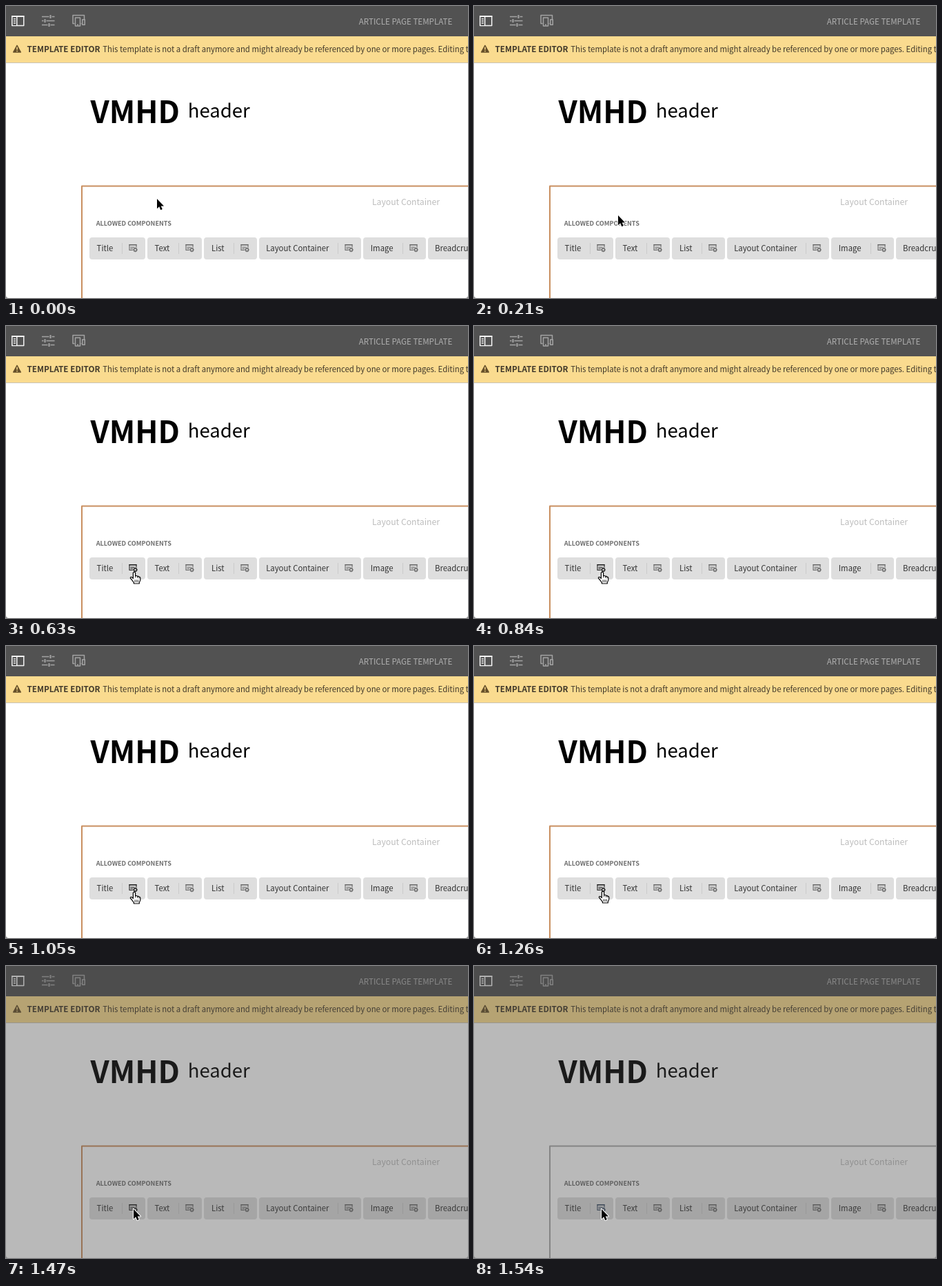
Write an HTML page with a canvas that moves like this. It is 670 px wide and 424 px high and loops after 1.61 s.

```html
<!DOCTYPE html>
<html lang="en">
<head>
<meta charset="utf-8">
<title>Template editor</title>
<style>
  html, body { margin: 0; width: 100%; height: 100%; overflow: hidden; background: #fff; }
  canvas { display: block; width: 670px; height: 424px; }
</style>
</head>
<body>
<canvas id="stage" width="670" height="424"></canvas>
<script>
const ctx = document.getElementById('stage').getContext('2d');
const WIDTH = 670, HEIGHT = 424;
const LOOP = 1610, STEP = 70;
const ARRIVE = 560, HOVER = 490, NUDGE = 1260, DIM = 1470, BLUR = 1540;
const FONT = '"Noto Sans CJK JP", "Noto Sans CJK SC", "Noto Sans CJK KR", "Open Sans", sans-serif';

const chips = [
  { label: 'Title', left: 121, right: 202, text: 131.6 },
  { label: 'Text', left: 205, right: 284, text: 215.6 },
  { label: 'List', left: 287, right: 364, text: 298 },
  { label: 'Layout Container', left: 367, right: 515, text: 377.2 },
  { label: 'Image', left: 518, right: 609, text: 528.8 },
  { label: 'Breadcrumb', left: 612, right: 734, text: 622 }
];

const arrowPath = new Path2D('M0 0V14.2L3.2 11.3L5.3 16.2L7.8 15.1L5.7 10.4H10Z');
const handPath = new Path2D(
  'M-1.6 9.5V1.4Q0 -1.2 1.6 1.4V6Q3.6 4.8 4.5 6.5Q6.2 5.8 6.9 7.4' +
  'Q8.8 7 8.8 9V11.5Q8.5 13.5 7.3 15V17H-.6V15.4Q-2 14 -3.2 12L-5.6 9.2Q-5.8 7 -3.6 7.7Z');
const knuckles = new Path2D('M1.6 6V8.5M4.5 6.5V9M6.9 7.4V9.5M1 11.5V15M3.2 11.5V15M5.4 11.5V15');

function rect(x, y, w, h, color) {
  ctx.fillStyle = color;
  ctx.fillRect(x, y, w, h);
}

function frame(x, y, w, h, color, line = 1) {
  ctx.strokeStyle = color;
  ctx.lineWidth = line;
  ctx.strokeRect(x, y, w, h);
}

function text(str, x, y, size, color, weight = 400) {
  ctx.font = `${weight} ${size}px ${FONT}`;
  ctx.fillStyle = color;
  ctx.fillText(str, x, y);
}

function panelIcon() {
  const white = '#f2f2f2';
  frame(8.75, 15, 17, 13.5, white, 1.5);
  rect(8, 14, 18.5, 2, white);
  rect(10, 16, 5, 12, '#525252');
  for (const y of [18, 21, 24]) rect(11, y, 3, 1.5, white);
  rect(15, 15, 1.5, 13, white);
}

function slidersIcon() {
  const gray = '#a3a3a3';
  [[15.5, 64], [21.5, 56], [27.5, 62]].forEach(([y, knob]) => {
    rect(52, y - 0.75, 18.5, 1.5, gray);
    rect(knob - 1.5, y - 3, 4, 6, '#525252');
    rect(knob - 0.5, y - 2.5, 2, 5, gray);
  });
}

function devicesIcon() {
  const gray = '#a3a3a3';
  frame(97, 13.5, 16.5, 12, gray, 1.5);
  rect(99.5, 15.5, 9, 15, '#525252');
  frame(100.5, 17, 7, 12, gray, 1.5);
  rect(103, 26.5, 2, 1.5, gray);
  rect(109.5, 19, 6, 11, '#525252');
  frame(110.75, 19.75, 3.5, 7.5, gray, 1.5);
}

function warningIcon() {
  ctx.fillStyle = ctx.strokeStyle = '#66502a';
  ctx.lineWidth = 1.5;
  ctx.lineJoin = 'round';
  ctx.beginPath();
  ctx.moveTo(16, 57.3);
  ctx.lineTo(21.3, 67);
  ctx.lineTo(10.7, 67);
  ctx.closePath();
  ctx.fill();
  ctx.stroke();
  rect(15.3, 59.5, 1.5, 4, '#fadb8f');
  rect(15.3, 64.8, 1.5, 1.5, '#fadb8f');
}

function policyIcon(x, y, color) {
  frame(x + 0.5, y + 0.5, 10, 8, color, 1.1);
  rect(x, y, 11, 1.6, color);
  rect(x + 2, y + 3.8, 7, 1.1, color);
  rect(x + 2, y + 6, 4, 1, color);
  ctx.fillStyle = '#dedede';
  ctx.beginPath();
  ctx.arc(x + 9, y + 8, 3.7, 0, Math.PI * 2);
  ctx.fill();
  ctx.strokeStyle = color;
  ctx.lineWidth = 1.3;
  ctx.beginPath();
  ctx.arc(x + 9, y + 8, 2, 0, Math.PI * 2);
  for (let i = 0; i < 8; i++) {
    const a = i * Math.PI / 4, c = Math.cos(a), s = Math.sin(a);
    ctx.moveTo(x + 9 + c * 2, y + 8 + s * 2);
    ctx.lineTo(x + 9 + c * 3.2, y + 8 + s * 3.2);
  }
  ctx.stroke();
}

function drawHeader() {
  rect(0, 0, WIDTH, 44, '#525252');
  panelIcon();
  slidersIcon();
  devicesIcon();
  text('ARTICLE PAGE TEMPLATE', 511.7, 27, 11.6, '#b0b0b0');

  rect(0, 44, WIDTH, 38, '#fadb8f');
  rect(0, 82, WIDTH, 1, '#c9c4b8');
  warningIcon();
  text('TEMPLATE EDITOR', 30.5, 66.7, 11.7, '#40382a', 700);
  text('This template is not a draft anymore and might already be referenced ' +
    'by one or more pages. Editing this template', 140.3, 66.7, 11.37, '#40382a');
}

function drawChip({ label, left, right, text: x }, iconColor) {
  ctx.fillStyle = '#dedede';
  ctx.beginPath();
  ctx.roundRect(left, 336, right - left, 32, 4);
  ctx.fill();
  text(label, x, 355.8, 11.35, '#323232');
  rect(right - 34, 344, 1, 16, '#cbcbcb');
  policyIcon(right - 23.5, 346, iconColor);
}

function drawContent(t) {
  text('VMHD', 122.5, 169.5, 44, '#000', 700);
  text('header', 263.8, 162, 27.5, '#000');

  frame(110, 261.5, WIDTH, HEIGHT, t >= BLUR ? '#aaa' : '#c98f60', 2);
  text('Layout Container', 531, 289, 12.2, '#bcbcbc');
  text('ALLOWED COMPONENTS', 130.7, 319, 9.1, '#6e6e6e', 700);

  const hoverColor = t >= BLUR ? '#3d4f66' : '#222';
  chips.forEach((chip, i) => drawChip(chip, i === 0 && t >= HOVER ? hoverColor : '#6b6b6b'));
}

function drawCorners() {
  ctx.fillStyle = '#8a8a8a';
  ctx.beginPath();
  ctx.rect(0, HEIGHT - 4, WIDTH, 4);
  ctx.roundRect(0, HEIGHT - 12, WIDTH, 12, 4);
  ctx.save();
  ctx.clip('evenodd');
  ctx.fillRect(0, HEIGHT - 4, 4, 4);
  ctx.fillRect(WIDTH - 4, HEIGHT - 4, 4, 4);
  ctx.restore();
}

function cursorAt(t) {
  if (t >= DIM) return [185.3, 353.3];
  if (t >= NUDGE) return [187, 355.8];
  const u = Math.min(t / ARRIVE, 1);
  const ease = u * u * (3 - 2 * u);
  return [219 - 33 * ease, 279.5 + 77 * ease];
}

function drawCursor(t) {
  const [x, y] = cursorAt(t);
  ctx.save();
  ctx.translate(Math.round(x), Math.round(y));
  ctx.lineJoin = 'round';
  if (t >= HOVER && t < DIM) {
    ctx.fillStyle = '#fff';
    ctx.strokeStyle = '#000';
    ctx.lineWidth = 1.2;
    ctx.fill(handPath);
    ctx.stroke(handPath);
    ctx.lineWidth = 0.8;
    ctx.stroke(knuckles);
  } else {
    ctx.fillStyle = '#000';
    ctx.strokeStyle = '#fff';
    ctx.lineWidth = 2;
    ctx.stroke(arrowPath);
    ctx.fill(arrowPath);
  }
  ctx.restore();
}

function draw(now) {
  const t = Math.floor(now % LOOP / STEP) * STEP;
  rect(0, 0, WIDTH, HEIGHT, '#fff');
  drawHeader();
  drawContent(t);
  if (t >= DIM) rect(0, 0, WIDTH, HEIGHT, 'rgba(69, 69, 69, 0.376)');
  drawCorners();
  drawCursor(t);
}

const start = performance.now();
function tick() {
  draw(performance.now() - start);
  requestAnimationFrame(tick);
}
tick();
</script>
</body>
</html>
```
